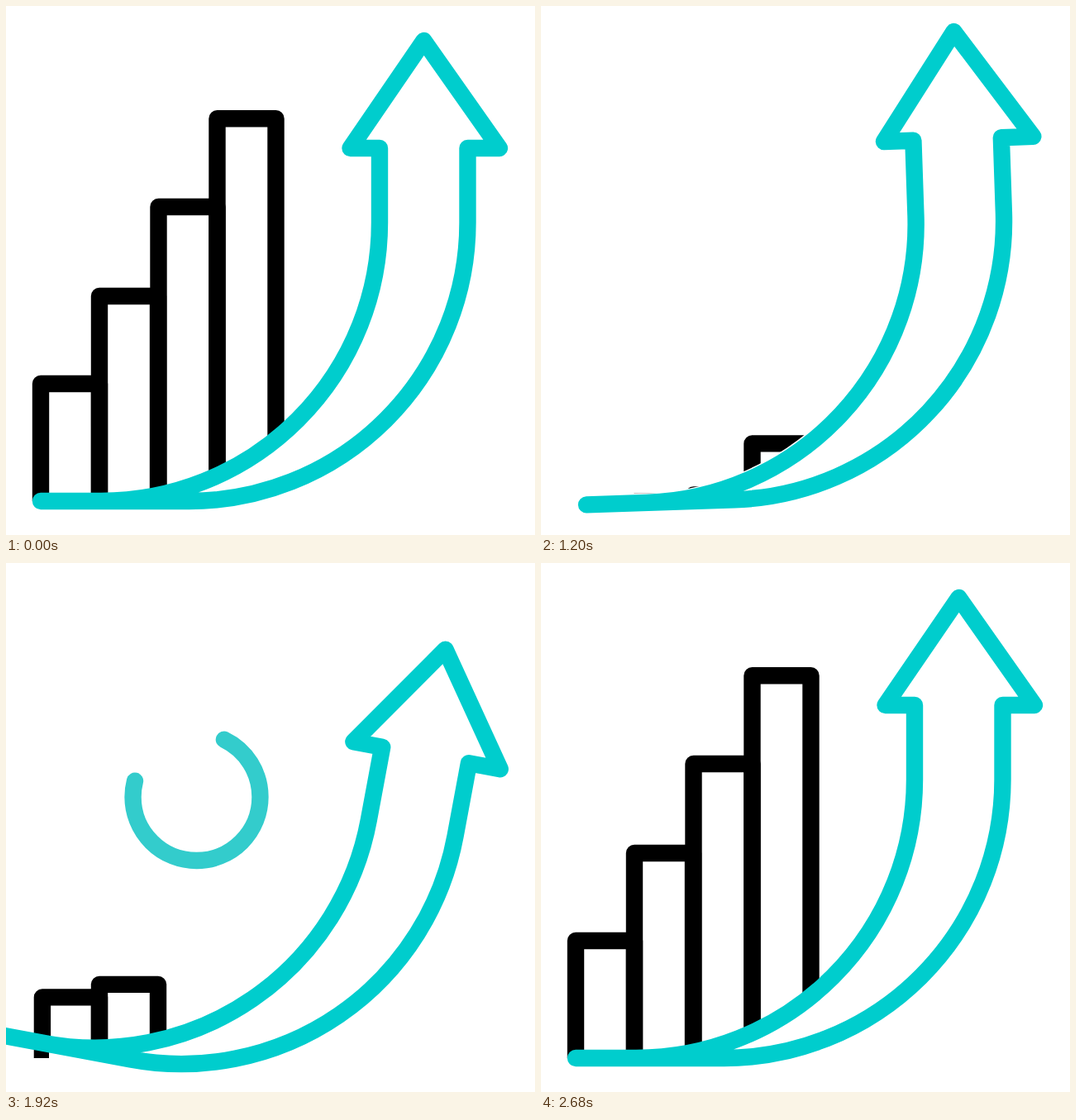
Animation, 640 px wide and 640 px high, one loop 3.16 s. Source, as an HTML page:

```html
<!DOCTYPE html>
<html lang="en">
<head>
<meta charset="utf-8">
<title>Growth chart</title>
<style>
  html, body { margin: 0; height: 100%; overflow: hidden; background: #fff; }
  svg { display: block; width: 100vw; height: 100vh; }
  path, use { fill: none; stroke-width: 20.4; stroke-linecap: round; stroke-linejoin: round; }
</style>
</head>
<body>
<svg viewBox="0 0 640 640">
  <defs>
    <clipPath id="aboveCurve">
      <path d="M0 0H443V262A328 328 0 0 1 115 590H52V599H0Z"/>
    </clipPath>
    <path id="arrow" d="M42 599H115A337 337 0 0 0 452 262V172H416.5L505.5 42L597 172H558.5V262A337 337 0 0 1 221.5 599Z"/>
  </defs>
  <g id="bars" clip-path="url(#aboveCurve)" stroke="#000"></g>
  <use id="leaving" href="#arrow" stroke="#00cdcd"/>
  <use id="arriving" href="#arrow" stroke="#00cdcd"/>
  <path id="ring" d="M230.5 206a77 77 0 0 0 0 154a77 77 0 0 0 0 -154" pathLength="360" stroke="#33cccc"/>
</svg>
<script>
const LOOP = 3160, STEP = 40, LAST = 2680;
const $ = id => document.getElementById(id);

// x, resting top, hidden top, [fall start, duration], [rise start, duration]
const bars = [
  [42, 457, 599, [33, 500], [1715, 400]],
  [113, 351, 600, [263, 500], [1730, 467]],
  [184.5, 243, 591.5, [512, 500], [1971, 467]],
  [255.5, 136.3, 575, [800, 500], [2213, 467]]
].map(([x, top, low, fall, rise]) => {
  const el = document.createElementNS('http://www.w3.org/2000/svg', 'path');
  $('bars').append(el);
  return { el, x, top, low, fall, rise };
});

function ease(t, start, duration) {
  const u = Math.min(1, Math.max(0, (t - start) / duration));
  return u * u * (3 - 2 * u);
}

function show(el, visible) {
  el.style.display = visible ? '' : 'none';
}

function turn(el, angle) {
  el.setAttribute('transform', `rotate(${angle} 178.5 215)`);
}

function draw(t) {
  bars.forEach(({ el, x, top, low, fall, rise }, i) => {
    const sunk = ease(t, ...fall) - ease(t, ...rise);
    const left = i ? x : x + 4 * sunk;
    el.setAttribute('d', `M${left} 620V${top + (low - top) * sunk}H${x + 71}V620`);
    show(el, i || sunk < 1);
  });

  const swing = ease(t, 1160, 891);
  turn($('leaving'), -330 * swing);
  show($('leaving'), swing < 0.46);
  turn($('arriving'), 180 * (1 - swing));
  show($('arriving'), swing > 0);

  const head = 360 * ease(t, 1276, 770);
  const tail = 360 * ease(t, 1693, 770);
  $('ring').setAttribute('stroke-dasharray', `${head - tail} 999`);
  $('ring').setAttribute('stroke-dashoffset', -tail);
  show($('ring'), head > tail);
}

function frame() {
  const t = performance.now() % LOOP;
  draw(Math.min(LAST + STEP, Math.floor(t / STEP) * STEP));
  requestAnimationFrame(frame);
}
frame();
</script>
</body>
</html>
```
